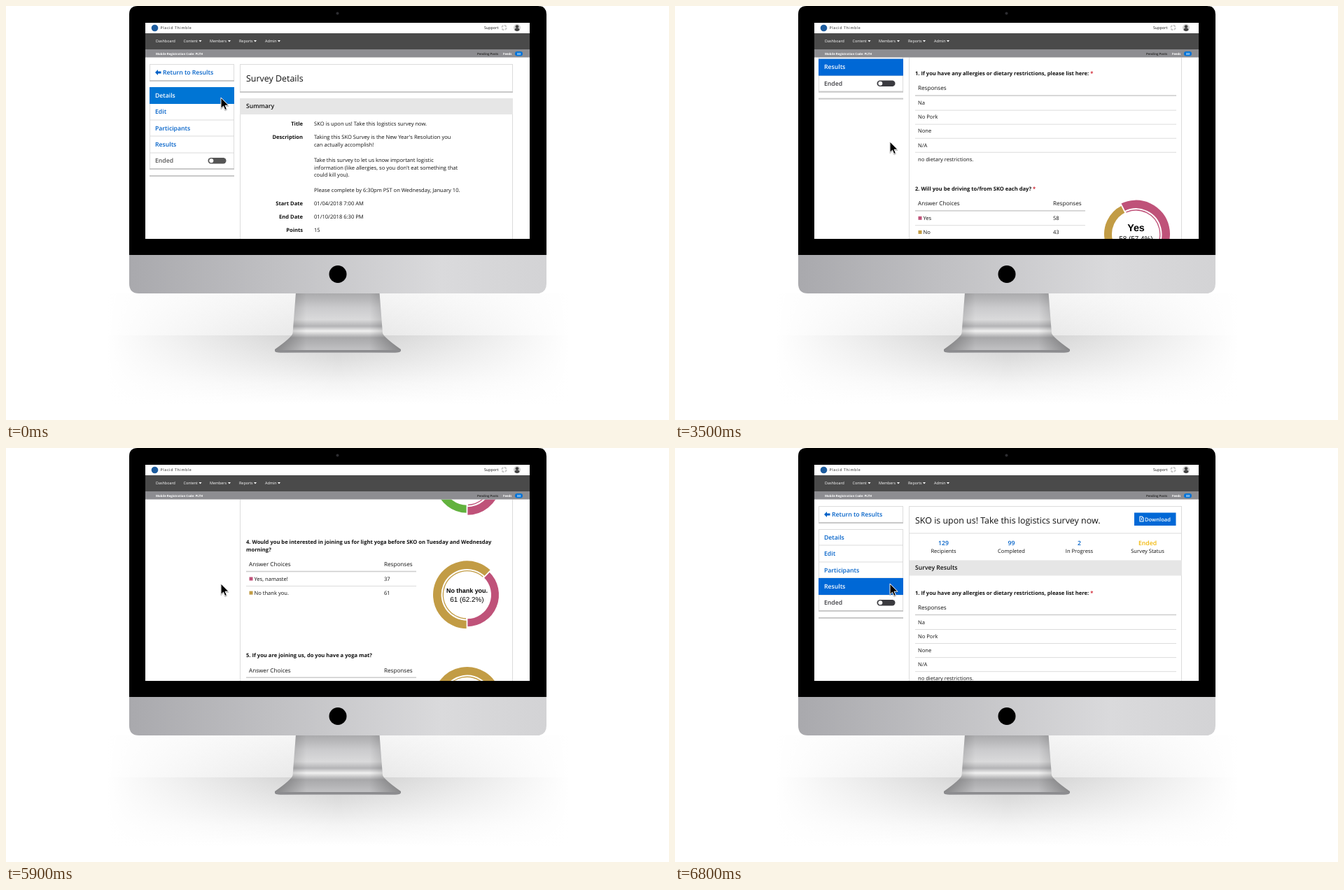
An HTML page for the animation above (8 s loop, 947 by 592 pixels).

```html
<!DOCTYPE html>
<html lang="en">
<head>
<meta charset="utf-8">
<title>Survey results</title>
<style>
html, body { margin: 0; width: 100%; height: 100%; overflow: hidden; background: #fff; }
svg { display: block; }
text { font-family: "Open Sans", "Noto Sans", sans-serif; white-space: pre; text-rendering: geometricPrecision; }
.chart text { font-family: "Liberation Sans", Arial, sans-serif; }
#cursor { filter: drop-shadow(0 1px .6px rgba(0, 0, 0, .35)); }
</style>
</head>
<body>
<svg width="947" height="592" viewBox="0 0 947 592">
  <defs>
    <linearGradient id="floor" x2="0" y2="1">
      <stop offset="0" stop-color="#cbcbcb"/><stop offset=".35" stop-color="#dedede"/>
      <stop offset=".7" stop-color="#f4f4f4"/><stop offset="1" stop-color="#fff"/>
    </linearGradient>
    <linearGradient id="wall" x2="0" y2="1">
      <stop offset="0" stop-color="#f3f3f3"/><stop offset="1" stop-color="#e4e4e4"/>
    </linearGradient>
    <linearGradient id="fade">
      <stop offset="0" stop-color="#fff"/><stop offset=".3" stop-color="#fff" stop-opacity=".4"/>
      <stop offset=".5" stop-color="#fff" stop-opacity="0"/><stop offset=".7" stop-color="#fff" stop-opacity=".4"/>
      <stop offset="1" stop-color="#fff"/>
    </linearGradient>
    <linearGradient id="chin">
      <stop offset="0" stop-color="#a9a9ad"/><stop offset=".35" stop-color="#c0c0c3"/>
      <stop offset=".75" stop-color="#dadadc"/><stop offset="1" stop-color="#d3d3d5"/>
    </linearGradient>
    <linearGradient id="stand" x2="0" y2="1">
      <stop offset="0" stop-color="#a9a9ab"/><stop offset=".25" stop-color="#cbcbcd"/>
      <stop offset=".45" stop-color="#dadadb"/><stop offset=".56" stop-color="#b4b4b6"/>
      <stop offset=".64" stop-color="#f0f0f0"/><stop offset=".75" stop-color="#a8a8aa"/>
      <stop offset="1" stop-color="#c6c6c8"/>
    </linearGradient>
    <linearGradient id="edges">
      <stop offset="0" stop-opacity=".3"/><stop offset=".25" stop-opacity="0"/>
      <stop offset=".75" stop-opacity="0"/><stop offset="1" stop-opacity=".3"/>
    </linearGradient>
    <clipPath id="view"><rect x="199" y="73.500" width="549" height="259.500"/></clipPath>
    <path id="foot" d="M414 410H533.500L538 468Q540 474 564 491V493Q563 495.500 556 495.500H392Q384 495.500 384 493V491Q408 474 409.500 468Z"/>
  </defs>

  <rect x="145" y="411" width="658" height="60" fill="url(#wall)"/>
  <rect x="145" y="471" width="658" height="98" fill="url(#floor)"/>
  <rect x="144" y="410" width="660" height="160" fill="url(#fade)"/>
  <use href="#foot" fill="url(#stand)"/>
  <use href="#foot" fill="url(#edges)"/>
  <path d="M384 492H564V493Q563 495.500 556 495.500H392Q384 495.500 384 493Z" fill="#8c8c8f"/>
  <path d="M176 356V12Q176 0 188 0H760Q772 0 772 12V356Z" fill="#000"/>
  <path d="M176 356H772V397Q772 411 758 411H190Q176 411 176 397Z" fill="url(#chin)"/>
  <circle cx="474" cy="383.500" r="12.500"/>
  <circle cx="473.500" cy="10.500" r="2" fill="#2c2c30"/>
  <rect x="199" y="24" width="549" height="309" fill="#fff"/>

  <g clip-path="url(#view)">
    <g id="details"></g>
    <g id="results"></g>
  </g>
  <g id="header"></g>
  <path id="cursor" d="M0 0V15.500L3.500 12.200 5.900 17.600 8.400 16.500 6.100 11.200H11Z" stroke="#fff" stroke-width="1" stroke-linejoin="round"/>
</svg>
<script>
const $ = id => document.getElementById(id);
const INK = '#111', LINE = '#dcdcdc', BLUE = '#0061c8';
const PINK = '#bf5279', GOLD = '#c29c45', GREEN = '#62b23e';
const BODY = 7.59, MID = 8.13, BIG = 8.67, HEAD = 12.45, LEADING = 10.84;

const text = (x, y, s, size = BODY, weight = 400, fill = INK, anchor = 'start') =>
  `<text x="${x}" y="${y}" font-size="${size}" font-weight="${weight}" fill="${fill}" text-anchor="${anchor}">${s}</text>`;
const rect = (x, y, w, h, fill, extra = '') =>
  `<rect x="${x}" y="${y}" width="${w}" height="${h}" fill="${fill}" ${extra}/>`;
const card = (x, y, w, h) =>
  rect(x + .5, y + .5, w - 1, h - 1, '#fff', `stroke="${LINE}"`) + rect(x, y + h - 2, w, 2, '#c9c9c9');

function header() {
  const caret = x => `<path d="M${x} 49h4l-2 2.600z" fill="#fff"/>`;
  const nav = [['Dashboard', 214], ['Content', 253.5, 275.5], ['Members', 291, 317], ['Reports', 333, 354], ['Admin', 370, 388]];
  return rect(199, 24, 549, 15, '#fff') + rect(199, 39, 549, 23, '#4a4a4a') + rect(199, 62, 549, 11.5, '#8d8d91') +
    '<circle cx="212.500" cy="31.500" r="4.800" fill="#1d5c9e"/>' +
    `<g letter-spacing=".6">${text(220.5, 33.2, 'Placid Thimble', 5.2, 600, '#555')}</g>` +
    text(683, 33, 'Support', 5.42) +
    '<circle cx="711.500" cy="31" r="3.200" fill="none" stroke="#c8c8c8" stroke-width="2" stroke-dasharray="3.500 1.500"/>' +
    '<circle cx="730" cy="31" r="5" fill="#d0d0d0"/><circle cx="730" cy="29.500" r="2.300" fill="#444"/>' +
    '<path d="M726.500 34.500q0-3 3.500-3t3.500 3q-3.500 3-7 0z" fill="#444"/>' +
    nav.map(([s, x, c]) => text(x, 52.3, s, 5.42, 400, '#fff') + (c ? caret(c) : '')).join('') +
    text(214, 69.6, 'Mobile Registration Code: PLTH', 4.34, 700, '#fff') +
    text(673, 69.6, 'Pending Posts', 4.34, 700, '#333') +
    text(710, 69.6, 'Feeds', 4.34, 700, '#fff') +
    rect(727, 65, 11, 6.5, '#0074d9', 'rx="3.200"') + text(732.5, 69.8, '33', 4.34, 700, '#fff', 'middle');
}

const rowTop = i => Math.round(116 + i * 23.4);

function sidebar(active, activeFill, dark) {
  const items = ['Details', 'Edit', 'Participants', 'Results', 'Ended'];
  return card(205, 83, 121, 25) +
    `<path d="M213 95l4-4v2.600h4.500v2.800H217V99z" fill="${BLUE}"/>` +
    text(224, 98, 'Return to Results', BIG, 600, BLUE) +
    card(205, 116, 121, 118) +
    `<rect class="hover" x="206" width="119" height="22" fill="#f3f3f3" visibility="hidden"/>` +
    items.map((s, i) => i ? rect(205, rowTop(i) - .5, 121, 1, LINE) : '').join('') +
    rect(205, rowTop(active), 121, 24, activeFill) +
    items.map((s, i) => text(213, 131 + i * 23.3, s, BIG, 600, i === active ? '#fff' : i === 4 ? dark : BLUE)).join('') +
    rect(288.5, 217, 26, 8.5, dark, 'rx="4.200"') + '<circle cx="293.300" cy="221.200" r="3" fill="#fff"/>' +
    rect(205, 242, 121, 2, '#c9c9c9');
}

function details() {
  const fields = [
    [171.2, 'Title', ['SKO is upon us! Take this logistics survey now.']],
    [190.2, 'Description', ["Taking this SKO Survey is the New Year's Resolution you", 'can actually accomplish!', '',
      'Take this survey to let us know important logistic', "information (like allergies, so you don't eat something that",
      'could kill you).', '', 'Please complete by 6:30pm PST on Wednesday, January 10.']],
    [285, 'Start Date', ['01/04/2018 7:00 AM']],
    [304, 'End Date', ['01/10/2018 6:30 PM']],
    [323, 'Points', ['15']],
  ];
  return sidebar(0, '#0075d4', '#555') +
    card(334, 83, 390, 41) + text(343, 107.8, 'Survey Details', HEAD) +
    card(334, 132, 390, 240) + rect(334, 132, 390, 23, '#e6e6e6') + text(343, 146.2, 'Summary', BIG, 600) +
    fields.map(([y, label, lines]) => text(424, y, label, BODY, 700, INK, 'end') +
      lines.map((s, i) => text(440, y + i * LEADING, s)).join('')).join('');
}

const title = (y, lines, required) => lines.map((s, i) =>
  text(343, y + i * LEADING, s + (required && i === lines.length - 1 ? ' <tspan fill="#d0202e">*</tspan>' : ''), BODY, 700)).join('');

function donut(cx, cy, answers, winner) {
  const total = answers.reduce((sum, a) => sum + a[1], 0);
  const point = (r, a) => `${cx + r * Math.sin(a)} ${cy + r * Math.cos(a)}`;
  const arc = (r, a, b, w, color) =>
    `<path d="M${point(r, a)}A${r} ${r} 0 ${+(b - a > Math.PI)} 0 ${point(r, b)}" fill="none" stroke="${color}" stroke-width="${w}"/>`;
  let angle = 0, rings = '', gaps = '';
  answers.forEach(([, n, color], i) => {
    const end = angle + n / total * 2 * Math.PI;
    rings += i === winner
      ? arc(42.7, angle, end, 11.6, color) + arc(34.2, angle + .04, end - .04, 1.3, color)
      : arc(40, angle, end, 11, color);
    gaps += `<path d="M${point(32, angle)}L${point(50, angle)}" stroke="#fff" stroke-width="1.800"/>`;
    angle = end;
  });
  const [name, count] = answers[winner];
  const long = name.length > 4;
  const share = +(count / total * 100).toFixed(1);
  return `<g class="chart">${rings}${gaps}` +
    text(cx, cy + (long ? -2.5 : -4), name, long ? 8.93 : 14.3, 700, '#000', 'middle') +
    text(cx, cy + 10.3, `${count} (${share}%)`, 9.9, 400, '#000', 'middle') + '</g>';
}

function choiceQuestion(y, lines, required, answers, winner) {
  const top = y + (lines.length - 1) * LEADING;
  return title(y, lines, required) +
    text(347, top + 21.3, 'Answer Choices', MID) + text(540, top + 21.3, 'Responses', MID) +
    rect(343, top + 28.2, 243, 1.6, '#cfcfcf') +
    answers.map(([s, n, color], i) => {
      const row = top + 42.2 + i * 20.1;
      return rect(347.5, row - 5.2, 5, 5, color) + text(354.5, row, s) + text(540, row, n) +
        (i < answers.length - 1 ? rect(343, row + 7.2, 243, 1, LINE) : '');
    }).join('') +
    donut(658.5, top + 62.3, answers, winner);
}

function results() {
  const stats = [[383.5, 129, 'Recipients'], [480.5, 99, 'Completed'], [577.5, 2, 'In Progress'], [675, 'Ended', 'Survey Status']];
  const diets = ['Na', 'No Pork', 'None', 'N/A', 'no dietary restrictions.'];
  return sidebar(3, '#0068d6', '#3a3a3f') +
    rect(334.5, 83.5, 389, 1200, '#fff', `stroke="${LINE}"`) +
    text(343, 107.8, 'SKO is upon us! Take this logistics survey now.', HEAD) +
    rect(656, 92.5, 59.5, 18.5, '#0068d6') +
    '<path d="M664 98h3l2 2v5h-5z" fill="none" stroke="#fff" stroke-width="1.100"/><path d="M666.500 100v3" stroke="#fff"/>' +
    text(671, 104.6, 'Download', BODY, 600, '#fff') +
    rect(335, 121.5, 389, 1, LINE) +
    stats.map(([x, n, s], i) => text(x, 139.2, n, BIG, 600, i === 3 ? '#f2b705' : BLUE, 'middle') +
      text(x, 149.7, s, BODY, 400, INK, 'middle')).join('') +
    rect(335, 160.5, 389, 22, '#e6e6e6') + text(343, 174, 'Survey Results', BIG, 600) +
    title(209.6, ['1. If you have any allergies or dietary restrictions, please list here:'], true) +
    text(347, 230.8, 'Responses', MID) + rect(343, 237.7, 373, 1.6, '#cfcfcf') +
    diets.map((s, i) => text(347, 251.8 + i * 20.05, s) +
      (i < 4 ? rect(343, 259 + i * 20.05, 373, 1, LINE) : '')).join('') +
    choiceQuestion(374.2, ['2. Will you be driving to/from SKO each day?'], true,
      [['Yes', 58, PINK], ['No', 43, GOLD]], 0) +
    choiceQuestion(526.2, ['3. If you are driving, would you be willing to take a couple people in your car to the evening',
      'activities (less than 5 miles from the SKO venue)?'], true,
      [['Yes', 43, PINK], ['No', 15, GOLD], ['N/A (I am not driving)', 42, GREEN]], 0) +
    choiceQuestion(688.7, ['4. Would you be interested in joining us for light yoga before SKO on Tuesday and Wednesday',
      'morning?'], false, [['Yes, namaste!', 37, PINK], ['No thank you.', 61, GOLD]], 1) +
    choiceQuestion(851.2, ['5. If you are joining us, do you have a yoga mat?'], false,
      [['Yes', 28, PINK], ['No', 68, GOLD]], 1);
}

$('header').innerHTML = header();
$('details').innerHTML = details();
$('results').innerHTML = results();
const hover = document.querySelector('#details .hover');

const LOOP = 8000, SCROLL_STEP = 110.4;
const down = [3500, 3600, 3700, 4200, 4300, 4400];
const up = [5900, 6000, 6100, 6600, 6700, 6800];

function draw() {
  const t = performance.now() % LOOP;
  const passed = times => times.filter(x => t >= x).length;
  const onResults = t >= 2000;
  $('details').style.display = onResults ? 'none' : '';
  $('results').style.display = onResults ? '' : 'none';
  $('results').setAttribute('transform', `translate(0 ${-SCROLL_STEP * (passed(down) - passed(up))})`);

  const step = Math.max(0, Math.min(6, Math.floor((t - 1000) / 100) + 1));
  const y = 131 + step * 10.5;
  $('cursor').setAttribute('transform', `translate(307 ${y})`);
  const row = Math.floor((y - rowTop(0)) / 23.4);
  hover.setAttribute('y', rowTop(row) + 1);
  hover.setAttribute('visibility', row ? 'visible' : 'hidden');
  requestAnimationFrame(draw);
}
draw();
</script>
</body>
</html>
```
